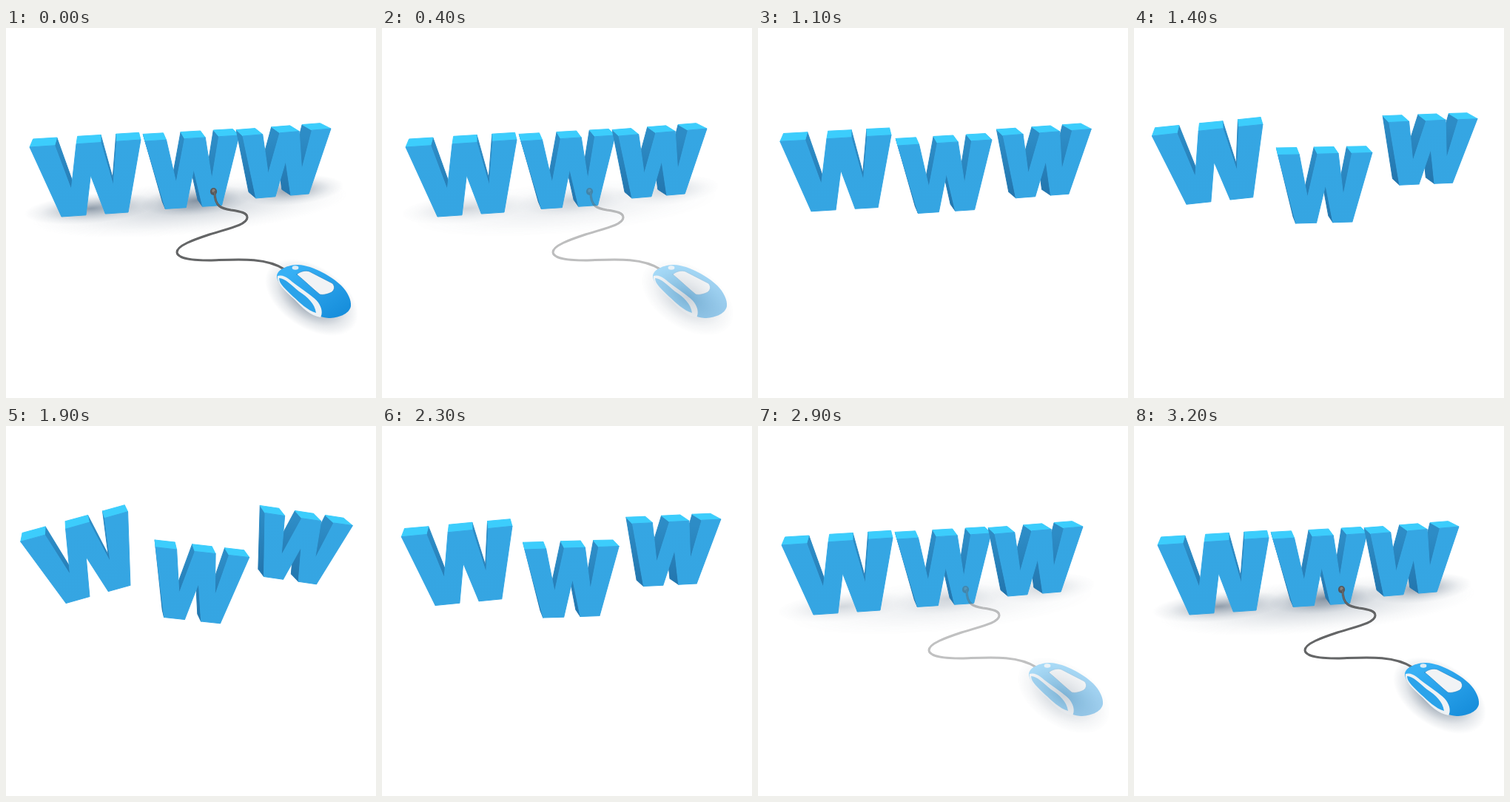
Animation, 500 px wide and 500 px high, one loop 3.3 s. Source, as an HTML page with a canvas:

```html
<!DOCTYPE html>
<html lang="en">
<head>
<meta charset="utf-8">
<title>WWW</title>
<style>
html, body { margin: 0; width: 100%; height: 100%; overflow: hidden; background: #fff; }
canvas { display: block; width: 100%; height: 100%; }
</style>
</head>
<body>
<canvas id="stage" width="500" height="500"></canvas>
<script>
const LOOP = 3300, STEP = 100;
const ctx = document.getElementById('stage').getContext('2d');

// One W in a unit box, clockwise; its three tops are the points with v = 0.
const outline = [
  [0, 0], [0.225, 0], [0.32, 0.63], [0.42, 0], [0.64, 0], [0.7, 0.61], [0.785, 0], [1, 0],
  [0.8, 1], [0.595, 1], [0.51, 0.45], [0.42, 1], [0.2, 1]
];

// Box of each letter and its poses [dx, dy, degrees] along the flight.
const letters = [
  { x: 32, y: 161, w: 150, h: 96, rise: 10, lean: 13,
    lift: [-2.5, -7, 0.5], drift: [-6, -18, -2.2], tilt: [-5, -21, -11.8] },
  { x: 188, y: 153, w: 127, h: 93, rise: 8, lean: 2,
    lift: [1, 6, 0], drift: [5, 21, 2.2], tilt: [6, 21, 9.8] },
  { x: 320, y: 146, w: 119, h: 86, rise: 10, lean: -6,
    lift: [11, 0, 0.4], drift: [23, -16, 2.5], tilt: [20, -16, 13] }
];

const route = [[10, 'rest'], [11, 'lift'], [14, 'drift'], [19, 'tilt'], [22, 'drift'], [26, 'rest']];

const TOP = '#3ccdfc', FACE = '#35a6e3', FOOT = '#35a5e2', SIDE = '#2d8cc6', DEEP = '#2274ac';

for (const l of letters) {
  l.rest = [0, 0, 0];
  l.center = [l.x + l.w / 2, l.y + (l.h - l.rise) / 2];
  l.front = outline.map(([u, v]) => [l.x + l.w * u + l.lean * v, l.y - l.rise * u + l.h * v]);
}

function poseAt(letter, step) {
  const i = route.findIndex(([s]) => s > step);
  if (i < 1) return letter.rest;
  const [s0, p0] = route[i - 1], [s1, p1] = route[i];
  const k = (step - s0) / (s1 - s0);
  return letter[p0].map((a, j) => a + (letter[p1][j] - a) * k);
}

function sceneAlpha(step) {
  if (step < 6) return 1 - Math.pow(step / 6, 1.35);
  return Math.max(0, (step - 27) / 5);
}

function polygon(pts, fill) {
  ctx.beginPath();
  pts.forEach(p => ctx.lineTo(...p));
  ctx.closePath();
  ctx.fillStyle = ctx.strokeStyle = fill;
  ctx.fill();
  ctx.stroke();
}

function gradient(g, x0, y0, x1, y1, from, to) {
  const grad = g.createLinearGradient(x0, y0, x1, y1);
  grad.addColorStop(0, from);
  grad.addColorStop(1, to);
  return grad;
}

// Extrusion towards a vanishing point above the first letter.
const back = ([x, y]) => [x - (x - 130) * 0.047, y - 11 + (x - 33) * 0.009];

function drawLetter(letter, step) {
  const [dx, dy, deg] = poseAt(letter, step);
  const [cx, cy] = letter.center, { front, y, h } = letter;
  ctx.save();
  ctx.translate(cx + dx, cy + dy);
  ctx.rotate(deg * Math.PI / 180);
  ctx.translate(-cx, -cy);
  ctx.lineJoin = 'round';
  const sides = gradient(ctx, 0, y, 0, y + h, SIDE, DEEP);
  const walls = front.map((a, i) => {
    const j = (i + 1) % front.length;
    return { a, b: front[j], top: outline[i][1] + outline[j][1] === 0 };
  });
  walls.sort((p, q) => p.top - q.top);
  for (const { a, b, top } of walls) {
    const far = back(a);
    const facing = (b[1] - a[1]) * (far[0] - a[0]) - (b[0] - a[0]) * (far[1] - a[1]);
    if (facing > 0) polygon([a, b, back(b), far], top ? TOP : sides);
  }
  polygon(front, gradient(ctx, 0, y, 0, y + h, FACE, FOOT));
  ctx.restore();
}

function layer(draw) {
  const c = document.createElement('canvas');
  c.width = c.height = 500;
  draw(c.getContext('2d'));
  return c;
}

function softSpot(g, x, y, rx, ry, deg, alpha) {
  g.save();
  g.translate(x, y);
  g.rotate(deg * Math.PI / 180);
  g.scale(rx, ry);
  const grad = g.createRadialGradient(0, 0, 0, 0, 0, 1);
  for (let r = 0; r <= 1; r += 0.25) {
    grad.addColorStop(r, `rgba(62,84,108,${alpha * (1 - r) ** 1.4})`);
  }
  g.fillStyle = grad;
  g.fillRect(-1, -1, 2, 2);
  g.restore();
}

function shape(g, d, fill) {
  g.fillStyle = fill;
  g.fill(new Path2D(d));
}

function line(g, d, color, width) {
  g.strokeStyle = color;
  g.lineWidth = width;
  g.stroke(new Path2D(d));
}

function dot(g, x, y, rx, ry, fill) {
  g.fillStyle = fill;
  g.beginPath();
  g.ellipse(x, y, rx, ry, 0, 0, 7);
  g.fill();
}

const shadows = layer(g => {
  softSpot(g, 248, 243, 215, 36, -5, 0.3);
  for (const { x, y, w, h } of letters) softSpot(g, x + w * 0.55, y + h - 13, w * 0.6, 20, -5, 0.55);
  softSpot(g, 413, 364, 70, 42, 33, 0.95);
});

const device = layer(g => {
  dot(g, 280.5, 221, 4.6, 5, '#56585b');
  dot(g, 280.5, 220, 2.2, 2.4, '#85807c');

  const cable = 'M282 222C282 242 292 244 304 246C318 248 326 250 326 256C326 266 300 271 275 279' +
    'C254 286 231 294 231 303C231 312 255 314 275 314C310 313 350 309 376 326';
  g.lineCap = 'round';
  line(g, cable, '#555657', 3);
  line(g, cable, '#7d7f81', 0.8);

  // Body, white rim with its blue inset, button plate, wheel.
  shape(g, 'M366 335C367 326 381 320 395 320C415 321 441 336 453 348C462 357 467 368 466 376' +
    'C464 387 448 392 436 392C415 391 396 371 380 356C371 348 366 342 366 335Z',
    gradient(g, 395, 322, 442, 392, '#37b0f5', '#188fdc'));
  shape(g, 'M367 335C376 332 384 341 392 347C404 356 417 364 422 371C427 378 428 386 425 391' +
    'C412 389 400 378 390 367C377 355 366 346 367 335Z', '#eef2f5');
  shape(g, 'M369 338C377 338 386 348 396 356C408 364 417 372 419 385C408 382 397 371 388 363' +
    'C378 353 369 346 369 338Z', '#2ba3ea');
  const plate = 'M393 333C397 329 405 327 410 329L441 345C445 349 444 354 440 357' +
    'C434 360 428 361 424 360C413 351 404 342 393 333Z';
  shape(g, plate, '#f1f3f5');
  line(g, plate, '#2387c8', 0.7);
  dot(g, 391, 324, 4.4, 2.7, '#dcecf6');
});

function drawLayer(image, alpha) {
  ctx.globalAlpha = alpha;
  ctx.drawImage(image, 0, 0);
  ctx.globalAlpha = 1;
}

let start;
function frame(now) {
  start ??= now;
  const step = Math.floor(((now - start) % LOOP) / STEP);
  const alpha = sceneAlpha(step);
  ctx.fillStyle = '#fff';
  ctx.fillRect(0, 0, 500, 500);
  drawLayer(shadows, alpha);
  letters.forEach(letter => drawLetter(letter, step));
  drawLayer(device, alpha);
  requestAnimationFrame(frame);
}
requestAnimationFrame(frame);
</script>
</body>
</html>
```
